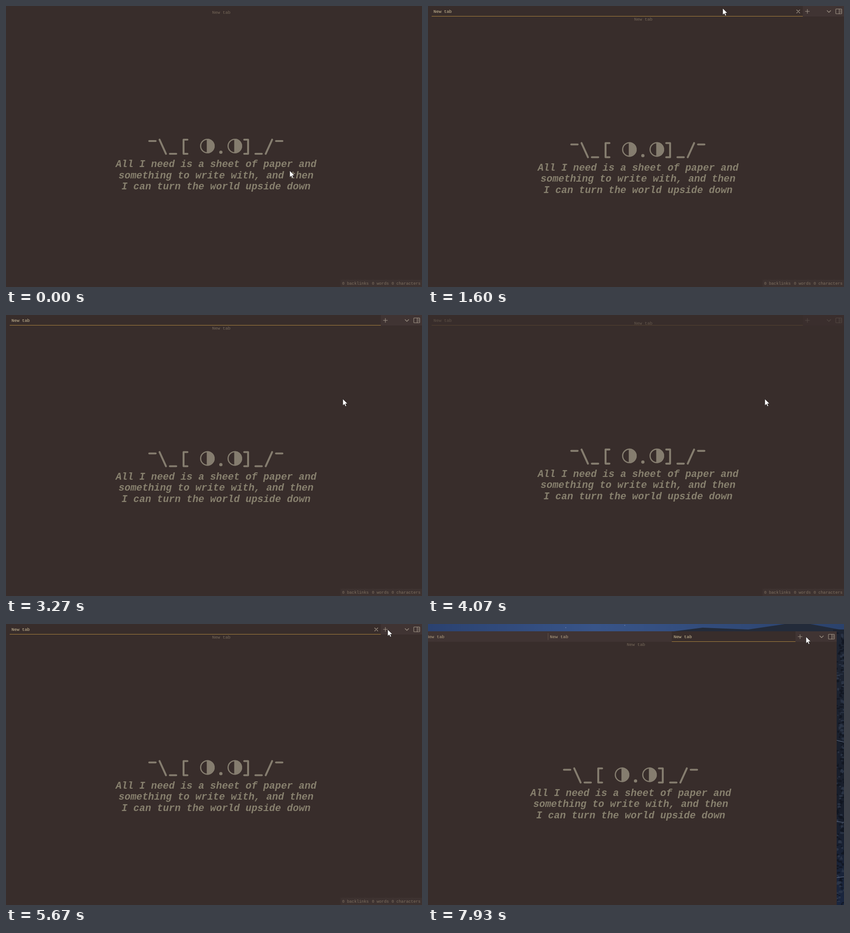
Write an HTML page that moves like this. It is 909 px wide and 616 px high and loops after 8000 ms.

```html
<!DOCTYPE html>
<html lang="en">
<head>
<meta charset="utf-8">
<title>New tab</title>
<style>
  html, body { margin: 0; width: 100%; height: 100%; overflow: hidden; background: #382d2b; }
  svg { display: block; width: 909px; height: 616px; }
  text { font: 9.55px "Liberation Mono", monospace; white-space: pre; }
  .quote { font-size: 21.5px; font-weight: bold; font-style: italic; fill: #87806e; text-anchor: middle; }
  .status { font-size: 8.8px; fill: #807262; }
  .line { fill: none; stroke-linecap: round; stroke-linejoin: round; }
  .icon { stroke: #a3988a; stroke-width: 1.1; }
  .face { stroke: #857d6f; stroke-width: 4.2; }
</style>
</head>
<body>
<svg viewBox="0 0 909 616">
  <defs>
    <linearGradient id="sky"><stop stop-color="#2b4270"/><stop offset=".4" stop-color="#385488"/><stop offset="1" stop-color="#2b426c"/></linearGradient>
    <linearGradient id="rock" x2="0" y2="1"><stop stop-color="#1d2432"/><stop offset=".65" stop-color="#171d2a"/><stop offset="1" stop-color="#1a2640"/></linearGradient>
  </defs>
  <rect width="909" height="616" fill="url(#sky)"/>
  <path d="M530 17L600 8L700 12L780 0H835L909 14V30H530Z" fill="#232b3a"/>
  <rect x="885" y="12" width="24" height="604" fill="url(#rock)"/>
  <g id="stones"></g>
  <path class="line" d="M893 255l16 4M893 433l16 2M893 556l16-2" stroke="#66728a"/>
  <path d="M300 8h2M429 3h2" stroke="#8796b8"/>

  <g id="window">
    <rect width="909" height="616" fill="#382d2b"/>
    <g id="content">
      <g class="line face">
        <path id="arm" d="M313 296H327M335.5 293L349.500 324M358 324H372M396.500 293H388V324H396.500"/>
        <use href="#arm" transform="translate(917 0) scale(-1 1)"/>
        <g id="eye" stroke-width="2.6"><circle cx="440" cy="307" r="14.700"/><path d="M440 292.300A14.700 14.700 0 0 1 440 321.700Z" fill="#857d6f"/></g>
        <use href="#eye" x="60"/>
        <circle cx="469.500" cy="320.500" r="3.600" fill="#857d6f" stroke="none"/>
      </g>
      <text class="quote" x="459" y="353">All I need is a sheet of paper and</text>
      <text class="quote" x="459" y="377.500">something to write with, and then</text>
      <text class="quote" x="459" y="402">I can turn the world upside down</text>
    </g>

    <g id="header">
      <g id="nav">
        <path class="line" d="M22 18H14.500M18 14.500L14.500 18L18 21.500M36 18H43.500M40 14.500L43.500 18L40 21.500" stroke="#655a52" stroke-width="1.1"/>
        <path class="line" d="M898 14.200v0M898 18.200v0M898 22.200v0" stroke="#b5a994" stroke-width="2.2"/>
      </g>
      <text id="title" x="450.500" y="17" fill="#b8a88b">New tab</text>
    </g>

    <g id="bar">
      <rect x="8" width="901" height="23" fill="#403433"/>
      <g id="tabs"></g>
      <path id="close" class="line icon" d="M805.500 8.500l7 7m0-7l-7 7"/>
      <path class="line icon" d="M824.500 11.700h9M829 7.200v9M872 10l4 4l4-4"/>
      <g class="line icon"><rect x="891" y="6.500" width="13" height="10.500" rx="1"/><path d="M898.500 6.500V17M901 9h1.200M901 11.500h1.200M901 14h1.200"/></g>
    </g>

    <rect x="731" y="600" width="178" height="16" fill="#3d3230"/>
    <text class="status" x="734.500" y="611">0 backlinks</text>
    <text class="status" x="799.500" y="611">0 words</text>
    <text class="status" x="842.500" y="611">0 characters</text>

    <path id="cursor" d="M0 0V14.500L3.400 11.500L5.700 16.400L8 15.300L5.800 10.600H10.400Z" fill="#fff" stroke="#181414" stroke-width=".7"/>
  </g>
</svg>

<script>
const LOOP = 8000, STEP = 1000 / 15;
const TAB_LEFT = 8, TAB_SPACE = 811, BAR_HEIGHT = 23;
const $ = id => document.getElementById(id);

const moves = [
  { from: 133, to: 467, x: 757, y: 246 },
  { from: 667, to: 1333, x: 665, y: 8 },
  { from: 1333, to: 1600, x: 644, y: 5 },
  { from: 1600, to: 2400, x: 445, y: 12 },
  { from: 2400, to: 2733, x: 753, y: 16 },
  { from: 2800, to: 3267, x: 736, y: 184 },
  { from: 4400, to: 5000, x: 702, y: 7 },
  { from: 5267, to: 5667, x: 834, y: 12 },
  { from: 6867, to: 7133, x: 815, y: 66 },
  { from: 7200, to: 7533, x: 842, y: 12 }
];

const ramp = (t, from, to) => Math.min(1, Math.max(0, (t - from) / (to - from)));
const smooth = k => k * k * (3 - 2 * k);

function cursorAt(t) {
  let x = 620, y = 361;
  for (const move of moves) {
    const k = smooth(ramp(t, move.from, move.to));
    x += (move.x - x) * k;
    y += (move.y - y) * k;
  }
  return { x, y };
}

const barAt = t => ramp(t, 1400, 1600) - ramp(t, 3867, 4133) + ramp(t, 5000, 5200);

// Hover states follow the pointer and fade over two steps.
const fadeIn = (test, t) => (test(t) + test(t - STEP)) / 2;

function overHeader(t) {
  const { y } = cursorAt(t), bar = barAt(t);
  return y > BAR_HEIGHT * bar && y < 36 + 15 * bar;
}

function overTabs(t) {
  const { x, y } = cursorAt(t);
  return y < BAR_HEIGHT && x < 838;
}

function add(parent, name, attrs) {
  const node = document.createElementNS('http://www.w3.org/2000/svg', name);
  for (const key in attrs) node.setAttribute(key, attrs[key]);
  return parent.appendChild(node);
}

const place = (node, x, y) => node.setAttribute('transform', `translate(${x} ${y})`);
const fade = (node, value) => node.setAttribute('opacity', value);

let seed = 7;
const random = () => (seed = seed * 16807 % 2147483647) / 2147483647;
for (let y = 20; y < 616; y += 3) {
  add($('stones'), 'ellipse', {
    cx: 893 + 16 * random(), cy: y, rx: 1 + 4 * random(), ry: 1 + 2 * random(),
    fill: random() < 0.6 ? '#0e131d' : '#303a4d', opacity: 0.7
  });
}

const tabs = [0, 1, 2].map(() => {
  const group = add($('tabs'), 'g', {});
  const fill = add(group, 'rect', { height: BAR_HEIGHT, fill: '#382d2b' });
  const underline = add(group, 'rect', { y: 22, height: 1, fill: '#a9833f' });
  const divider = add(group, 'rect', { x: -0.5, y: 4, width: 1, height: 15, fill: '#65564d' });
  const label = add(group, 'text', { x: 4, y: 15 });
  label.textContent = 'New tab';
  return { group, fill, underline, divider, label };
});

function layoutTabs(shares) {
  const total = shares.reduce((a, b) => a + b);
  const active = shares.findLastIndex(share => share > 0);
  let x = TAB_LEFT;
  tabs.forEach((tab, i) => {
    const width = TAB_SPACE * shares[i] / total;
    const isActive = i === active;
    place(tab.group, x, 0);
    tab.group.setAttribute('visibility', width ? 'visible' : 'hidden');
    for (const part of [tab.fill, tab.underline]) {
      part.setAttribute('width', width);
      fade(part, +isActive);
    }
    fade(tab.divider, +(i > 0 && !isActive));
    fade(tab.label, +(width > 50));
    tab.label.setAttribute('fill', isActive ? '#d0c09a' : '#b3a082');
    x += width;
  });
}

function draw(time) {
  const t = Math.floor(time % LOOP / STEP + 0.05) * STEP + 0.5;
  const bar = barAt(t), hover = fadeIn(overHeader, t);
  const pan = 16 * ramp(t, 7800, 7933);
  const cursor = cursorAt(t);
  place($('window'), -pan, pan);
  place($('content'), 0, 7.5 * bar);
  place($('header'), 0, 15 * bar);
  place($('title'), 0, 4 * hover);
  place($('cursor'), cursor.x, cursor.y);
  fade($('title'), 0.48 + 0.52 * hover);
  fade($('nav'), hover);
  fade($('bar'), bar);
  fade($('close'), fadeIn(overTabs, t));
  layoutTabs([1, ramp(t, 6067, 6333), ramp(t, 6400, 6667)]);
}

const start = performance.now();
function tick() {
  draw(performance.now() - start);
  requestAnimationFrame(tick);
}
tick();
</script>
</body>
</html>
```
